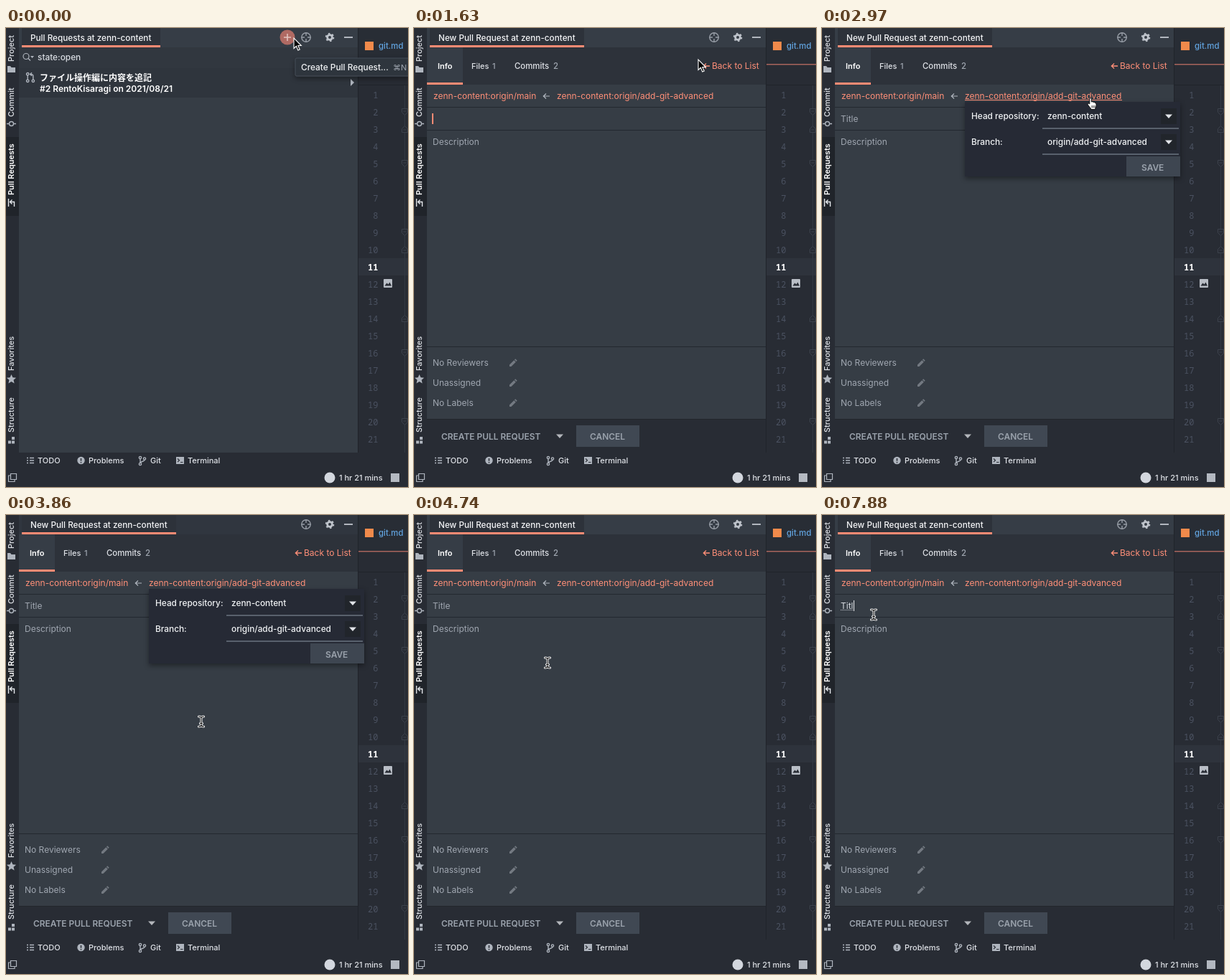
Recreate the animation shown at these times as an HTML page. Size 560x640 px, loop 8000 ms.

```html
<!DOCTYPE html>
<html lang="en">
<head>
<meta charset="utf-8">
<title>New pull request</title>
<style>
html, body { margin: 0; width: 100%; height: 100%; overflow: hidden; background: #282c34; }
svg { display: block; width: 560px; height: 640px; }
text { font: 12px Inter, "Noto Sans CJK JP", "Noto Sans", sans-serif; fill: #d8dce2; white-space: pre; }
.tab { font-size: 11.75px; font-weight: 500; fill: #f4f5f7; }
.s { font-size: 11px; font-weight: 500; fill: #dfe2e7; }
.w { fill: #fff; font-weight: 600; }
.m { font-size: 11.85px; font-weight: 500; fill: #f0f2f4; }
.hint { fill: #a0a7b1; }
.link { fill: #ff8f78; }
.btn { font-size: 11.95px; font-weight: 600; fill: #9aa2ac; }
.num { font: 12px "Noto Sans Mono", "DejaVu Sans Mono", monospace; fill: #4b5261; text-anchor: end; }
.num.on { fill: #fff; font-weight: 700; }
.o { fill: none; stroke: #afb5be; stroke-width: 1.4; }
.f { fill: #afb5be; }

/* one 8 s clock; every change is a hard step */
.a { animation: 8s step-end infinite; }
.list { animation-name: list; }
.tip { animation-name: tip; }
.form { animation-name: form; }
.caret { animation-name: caret; }
.title { animation-name: title; }
.pop { animation-name: pop; }
.dim { animation-name: dim; }
.under { animation-name: under; }
.type { animation-name: type; }
.bar { animation-name: type, bar; }
.move { animation-name: move; }
.arrow { animation-name: arrow; }
.beam { animation-name: beam; }
.hand { animation-name: hand; }

@keyframes list { 0% { opacity: 1 } 7.37%, 100% { opacity: 0 } }
@keyframes tip { 0% { opacity: 1 } 5.49%, 100% { opacity: 0 } }
@keyframes form { 0% { opacity: 0 } 7.37%, 100% { opacity: 1 } }
@keyframes caret {
  0%, 12.87%, 24%, 37.12%, 72.37%, 81.62%, 100% { opacity: 0 }
  7.37%, 18.49%, 31.49%, 64.87%, 77.99% { opacity: 1 }
}
@keyframes title { 0%, 64.87%, 100% { opacity: 0 } 37.12% { opacity: 1 } }
@keyframes pop { 0%, 51.99%, 100% { opacity: 0 } 37.12% { opacity: 1 } }
@keyframes dim { 0%, 51.99%, 100% { opacity: 0 } 38.99% { opacity: 1 } }
@keyframes under { 0%, 44.62%, 100% { opacity: 0 } 31.49% { opacity: 1 } }
@keyframes bar { 0% { opacity: 0 } 81.62%, 100% { opacity: 1 } }
@keyframes type {
  0% { transform: translateX(0) }
  81.62% { transform: translateX(8px) }
  87.24% { transform: translateX(11px) }
  94.74% { transform: translateX(15px) }
  98.49%, 100% { transform: translateX(18px) }
}
@keyframes arrow { 0%, 44.62% { opacity: 1 } 27.74%, 48.24%, 100% { opacity: 0 } }
@keyframes beam { 0%, 31.49% { opacity: 0 } 27.74%, 48.24%, 100% { opacity: 1 } }
@keyframes hand { 0%, 44.62%, 100% { opacity: 0 } 31.49% { opacity: 1 } }
@keyframes move {
  0% { transform: translate(401px, 14px) }
  16.62% { transform: translate(400px, 16px) }
  18.49% { transform: translate(399px, 26px) }
  20.37% { transform: translate(396px, 44px) }
  22.24% { transform: translate(391px, 64px) }
  23.99% { transform: translate(385px, 84px) }
  25.87% { transform: translate(379px, 104px) }
  27.74% { transform: translate(376px, 113px) }
  31.49% { transform: translate(375px, 100px) }
  33.37% { transform: translate(374px, 98px) }
  44.62% { transform: translate(362px, 122px) }
  46.43% { transform: translate(318px, 205px) }
  48.24% { transform: translate(272px, 288px) }
  51.99% { transform: translate(270px, 294px) }
  53.87% { transform: translate(261px, 255px) }
  55.62% { transform: translate(232px, 236px) }
  57.49% { transform: translate(186px, 206px) }
  59.37% { transform: translate(138px, 176px) }
  61.24% { transform: translate(103px, 154px) }
  62.99% { transform: translate(80px, 142px) }
  64.87%, 100% { transform: translate(72px, 139px) }
}
</style>
</head>
<body>
<svg viewBox="0 0 560 640">
  <defs>
    <filter id="shadow" x="-20%" y="-40%" width="140%" height="200%">
      <feDropShadow dx="0" dy="3" stdDeviation="3.5" flood-color="#000" flood-opacity=".4"/>
    </filter>
    <clipPath id="typed"><rect class="a type" x="0" y="112" width="26" height="28"/></clipPath>
    <path id="pencil" class="f" opacity=".5" d="M-5 5v-2.500l6.300-6.300 2.500 2.500-6.300 6.300zM2-4.500l1.200-1.200 2.500 2.500-1.200 1.200z"/>
    <path id="drop" d="M-5-2.500H5L0 3z" fill="#e1e4e8"/>
    <g id="branch" class="o">
      <circle cx="2" cy="2" r="1.6"/><circle cx="2" cy="11" r="1.6"/><circle cx="8" cy="3.5" r="1.6"/>
      <path d="M2 3.6v5.8M8 5c0 3-6 2-6 4.5"/>
    </g>
    <g id="pull" class="o">
      <circle cx="2.2" cy="2.2" r="1.7"/><circle cx="2.2" cy="11.8" r="1.7"/><circle cx="9.8" cy="11.8" r="1.7"/>
      <path d="M2.2 4v6M9.8 10V5q0-2.6-3.6-2.6M8 .2 5.6 2.4 8 4.8"/>
    </g>
    <path id="ibeam" d="M-3.500-7Q0-7 0-5V5Q0 7-3.500 7M3.500-7Q0-7 0-5M0 5Q0 7 3.500 7M-1.500 2.500h3"/>
  </defs>

  <rect width="560" height="640" fill="#282c34"/>

  <!-- editor -->
  <rect x="491" width="69" height="50" fill="#282d35"/>
  <rect x="491" y="50" width="69" height="1.5" fill="#a9655d"/>
  <rect x="491" y="79" width="69" height="1" fill="#20242a"/>
  <rect x="491" y="321" width="69" height="24" fill="#2e333c"/>
  <path d="M555.5 80V592" stroke="#333942"/>
  <rect x="500" y="19" width="12" height="12" fill="#f08a4b"/>
  <text x="519" y="29" style="font-size:11.4px;font-weight:500;fill:#62a4e0">git.md</text>
  <g id="gutter"></g>
  <rect x="526" y="350" width="12" height="12" rx="1" fill="#b9bec6"/>
  <path d="M527.5 359.5l3-4 2 2 2-3 2.5 5z" fill="#282c34"/>

  <!-- panel -->
  <rect x="18" width="472" height="592" fill="#363d45"/>
  <rect x="18" width="472" height="27" fill="#363d46"/>
  <rect class="a dim" x="18" width="472" height="27" fill="#30363f"/>

  <g class="a list">
    <rect x="22" width="193" height="27" fill="#2d323a"/>
    <rect x="22" y="24" width="193" height="3" fill="#ff8b74"/>
    <text class="tab" x="34" y="18">Pull Requests at zenn-content</text>
    <rect x="18" y="27" width="472" height="29" fill="#31373f"/>
    <circle class="o" style="stroke-width:1.200" cx="28" cy="39.500" r="4"/>
    <path class="o" style="stroke-width:1.200" d="M31 42.500l3 3"/>
    <path class="f" d="M34 39h5l-2.500 3z"/>
    <text x="44" y="45" style="font-size:11.85px;font-weight:500">state:open</text>
    <rect x="18" y="56" width="472" height="41" fill="#2f353d"/>
    <use href="#pull" x="28" y="62"/>
    <text class="w" x="47" y="73.500">ファイル操作編に内容を追記</text>
    <text class="w" x="47" y="89">#2 RentoKisaragi on 2021/08/21</text>
    <path class="f" d="M480 71l5 5-5 5z"/>
    <circle cx="392" cy="13" r="10.500" fill="#b06a63"/>
    <path d="M387 13h10M392 8v10" stroke="#e3c3bf" stroke-width="1.600"/>
  </g>

  <g class="a form">
    <rect x="22" width="215" height="27" fill="#2d323a"/>
    <rect x="22" y="24" width="215" height="3" fill="#ff8b74"/>
    <text class="tab" x="34" y="18">New Pull Request at zenn-content</text>
    <rect x="18" y="27" width="472" height="52" fill="#2d323a"/>
    <rect x="18" y="27" width="50" height="52" fill="#363d46"/>
    <rect x="18" y="76" width="50" height="3" fill="#ff8b74"/>
    <text class="s" x="33" y="57" style="font-weight:600;fill:#fff">Info</text>
    <text class="s" x="80" y="57">Files <tspan class="hint" x="109">1</tspan></text>
    <text class="s" x="140" y="57" style="font-size:11.4px">Commits <tspan class="hint" x="194">2</tspan></text>
    <path d="M412 53h-8.500M407 49.500l-3.700 3.500 3.700 3.500" fill="none" stroke="#ff8f78" stroke-width="1.300"/>
    <text class="link" x="415" y="57">Back to List</text>
    <text class="link" x="27" y="99">zenn-content:origin/main</text>
    <path class="o" style="stroke-width:1.200" d="M189 95h-8.500M184 91.500l-3.700 3.500 3.700 3.500"/>
    <text class="link" x="199" y="99">zenn-content:origin/add-git-advanced</text>
    <rect class="a under" x="199" y="100" width="219" height="1" fill="#ff8f78"/>
    <path d="M18 110.500H490M18 142.500H490M18 444.500H490" stroke="#23282f"/>
    <text class="hint a title" x="26" y="131">Title</text>
    <rect class="a caret" x="25" y="119" width="2" height="15" fill="#ff8b74"/>
    <g clip-path="url(#typed)">
      <text x="26" y="131">Titl</text>
      <path d="M26 132.500H45" stroke="#c3c8cf" stroke-dasharray="1 1"/>
    </g>
    <rect class="a bar" x="26" y="119" width="1" height="15" fill="#e8eaed"/>
    <text class="hint" x="26" y="163">Description</text>
    <text class="hint" x="26" y="471">No Reviewers</text>
    <text class="hint" x="26" y="499">Unassigned</text>
    <text class="hint" x="26" y="527">No Labels</text>
    <use href="#pencil" x="138" y="467"/><use href="#pencil" x="138" y="495"/><use href="#pencil" x="138" y="523"/>
    <rect x="18" y="545" width="472" height="47" fill="#282c34"/>
    <path d="M18 545.500H490" stroke="#22262c"/>
    <text class="btn" x="38" y="574">CREATE PULL REQUEST</text>
    <use href="#drop" x="203" y="569" opacity=".75"/>
    <rect x="226" y="554" width="88" height="30" fill="#404853"/>
    <text class="btn" x="245" y="574">CANCEL</text>
  </g>

  <!-- header tools -->
  <g style="opacity:.8">
    <circle class="o" cx="418" cy="13" r="6.200"/>
    <path class="o" d="M418 6v5M418 15v5M411 13h5M420 13h5"/>
  </g>
  <circle cx="451" cy="13" r="3.400" fill="none" stroke="#c0c5cc" stroke-width="2.800"/>
  <circle cx="451" cy="13" r="5.300" fill="none" stroke="#c0c5cc" stroke-width="1.900" stroke-dasharray="2.400 3.150"/>
  <path d="M471 13h12" stroke="#c0c5cc" stroke-width="1.800"/>
  <path d="M490.500 0V592" stroke="#20242a"/>

  <!-- left stripe -->
  <rect y="152" width="18" height="110" fill="#20242a"/>
  <g id="stripe"></g>
  <path class="f" d="M2 53h4l1.500 2H13v7H2z"/>
  <circle class="o" cx="7.500" cy="133.500" r="3"/><path class="o" d="M1 133.500h3.500M10.500 133.500h3.500"/>
  <path class="o" style="stroke:#e4e7eb" d="M3.500 238v11M11.500 249v-6.500H6M8.500 239.500L5.500 242.500l3 3"/>
  <path class="f" d="M7.500 483l1.900 4.300 4.700.4-3.600 3.100 1.100 4.600-4.100-2.500-4.100 2.500 1.100-4.600L.9 487.700l4.700-.4z"/>
  <path class="f" d="M8 570h4v4H8zM3 575.500h4v4H3zM8 575.500h4v4H8z"/>

  <!-- bottom bars -->
  <path class="o" d="M29 599.500h2M33 599.500h6M29 603h2M33 603h6M29 606.500h2M33 606.500h6"/>
  <text class="s" x="44" y="607">TODO</text>
  <circle class="f" cx="104.500" cy="603" r="5.200"/>
  <path d="M104.500 600v3.700M104.500 605v1.500" stroke="#282c34" stroke-width="1.500"/>
  <text class="s" x="115" y="607">Problems</text>
  <use href="#branch" x="185" y="597"/>
  <text class="s" x="201" y="607">Git</text>
  <rect class="f" x="237" y="598" width="11" height="10"/>
  <path d="M239 600.500l2.500 2.300-2.500 2.300M243 605.500h3.500" fill="none" stroke="#282c34" stroke-width="1.200"/>
  <text class="s" x="253" y="607">Terminal</text>
  <path class="o" style="stroke-width:1.200" d="M6.500 621.500h8v8h-8zM6.500 624h-3v8.500h8.500v-3"/>
  <circle cx="451" cy="627" r="7.500" fill="#d3d7de"/>
  <text class="s" x="464" y="631">1 hr 21 mins</text>
  <rect x="536" y="621" width="12" height="12" fill="#b4b9c1"/>

  <g class="a tip">
    <rect x="403" y="42" width="170" height="25" rx="2" fill="#2f353d" stroke="#454c56" filter="url(#shadow)"/>
    <text class="m" x="411" y="59">Create Pull Request...</text>
    <text class="hint" x="539" y="59" style="font-size:11px">⌘N</text>
  </g>

  <g class="a pop">
    <rect x="199" y="103" width="300" height="104" fill="#282c34" filter="url(#shadow)"/>
    <text class="m" x="208" y="127">Head repository:</text>
    <text class="m" x="208" y="163">Branch:</text>
    <rect x="472" y="112" width="22" height="22" fill="#21252b"/>
    <rect x="472" y="148" width="22" height="22" fill="#21252b"/>
    <text class="m" x="314" y="127">zenn-content</text>
    <text class="m" x="314" y="163">origin/add-git-advanced</text>
    <path d="M307 140H497M307 176H497" stroke="#59616d" stroke-width="2"/>
    <use href="#drop" x="483" y="123"/><use href="#drop" x="483" y="159"/>
    <rect x="424" y="179" width="75" height="28" fill="#3e4651"/>
    <text class="btn" x="445" y="199">SAVE</text>
  </g>

  <!-- pointer -->
  <g class="a move">
    <path class="a arrow" d="M0 0V14.500L3.400 11.300 5.800 17 8.200 16 5.800 10.500H10.300Z" fill="#000" stroke="#fff" stroke-width="1.100"/>
    <g class="a beam" fill="none" stroke-linecap="round">
      <use href="#ibeam" stroke="#fff" stroke-width="3"/>
      <use href="#ibeam" stroke="#111" stroke-width="1.100"/>
    </g>
    <g class="a hand">
      <path d="M-1.200 8V.800Q-1.200-.500 0-.500T1.300.800V5Q3.500 4 4 5.500 6 4.800 6.300 6.500 8 6 8 8V10.500Q8 12 6.800 13.500V15.500H.500V14Q-1.500 12.500-3.800 8.800-4.300 7.200-3 7-2.200 7-1.200 8Z" fill="#fff" stroke="#111" stroke-width="1"/>
      <path d="M2 10v3.500M4 10v3.500M6 10v3.500" stroke="#111" stroke-width=".8"/>
    </g>
  </g>
</svg>
<script>
const byId = id => document.getElementById(id);

const labels = [["Project", 47], ["Commit", 124], ["Pull Requests", 233], ["Favorites", 478], ["Structure", 564]];
byId("stripe").innerHTML = labels.map(([name, y]) =>
  `<text class="s" transform="translate(11 ${y}) rotate(-90)"${name === "Pull Requests" ? ' style="fill:#fff;font-weight:600"' : ""}>${name}</text>`
).join("");

// fold markers: 1 opens a block, -1 closes it
const folds = { 2: 1, 3: -1, 5: 1, 9: 1, 10: -1, 14: -1, 16: 1, 20: 1 };
let rows = "";
for (let n = 1; n <= 21; n++) {
  const y = 69 + n * 24;
  rows += `<text class="num${n === 11 ? " on" : ""}" x="518.500" y="${y + 4.5}">${n}</text>`;
  if (folds[n]) {
    rows += `<path transform="translate(555.500 ${y}) scale(1 ${folds[n]})" d="M-4-4.500h8v5L0 4.500-4 .5zM-2-1h4" fill="#282c34" stroke="#3c424c"/>`;
  }
}
byId("gutter").innerHTML = rows;
</script>
</body>
</html>
```
